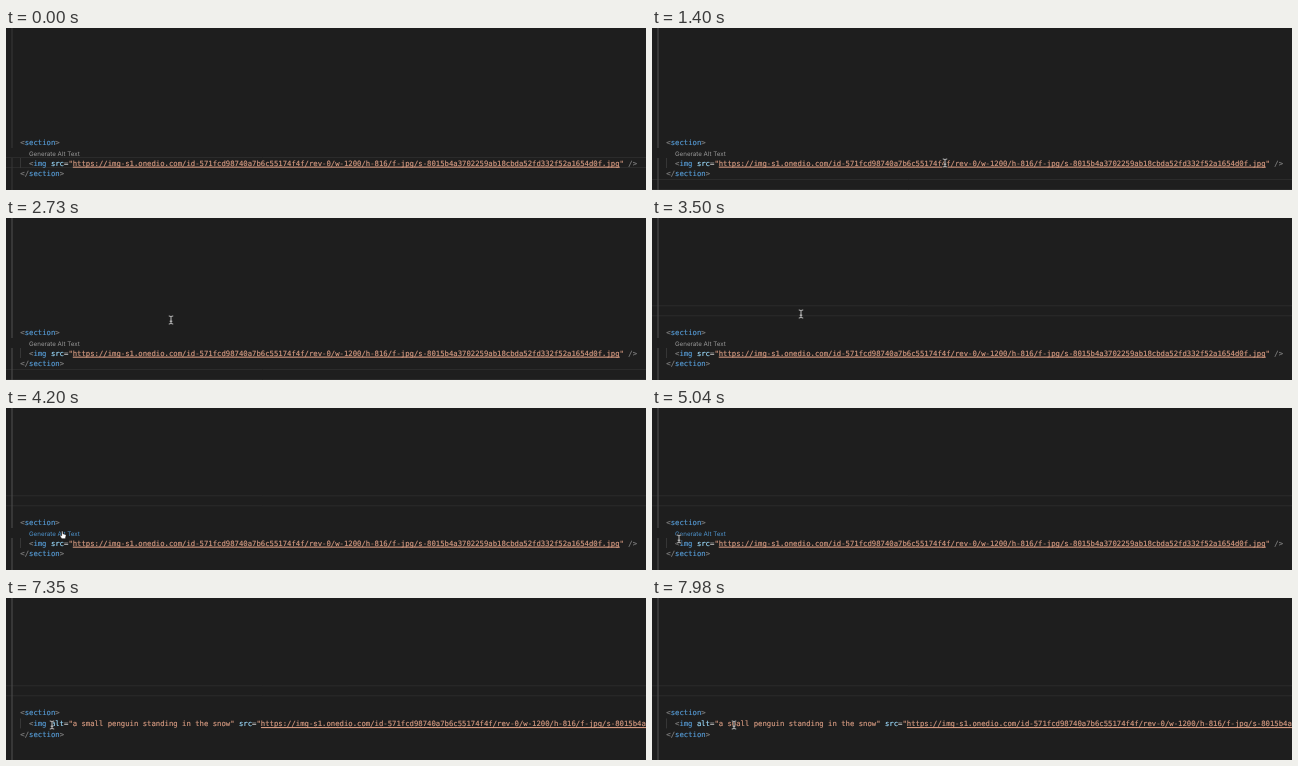
An HTML page for the animation above (8 s loop, 640 px wide and 162 px high).

```html
<!DOCTYPE html>
<html lang="en">
<head>
<meta charset="utf-8">
<style>
  html, body { margin: 0; height: 100%; overflow: hidden; background: #1e1e1e; }
  svg { display: block; }
  text {
    font: 7.27px "DejaVu Sans Mono", monospace;
    white-space: pre;
    text-rendering: geometricPrecision;
    color: #d4d4d4;
  }
  text, tspan { fill: currentColor; stroke: currentColor; stroke-width: .15px; }
  #lens { font: 6.2px Inter, sans-serif; stroke: none; }
  .punct { color: #808080; }
  .tag { color: #569cd6; }
  .attr { color: #9cdcfe; }
  .str { color: #d69a80; }
</style>
</head>
<body>
<svg width="640" height="162" viewBox="0 0 640 162">
  <defs>
    <path id="beamShape" d="M-1.9-4Q-.3-4 0-3.2Q.3-4 1.9-4M0-3.2V3.2M-1.9 4Q-.3 4 0 3.2Q.3 4 1.9 4M-1 1.2H1"/>
  </defs>
  <path id="currentLine" fill="none" stroke="#2b2b2b"/>
  <path id="guide" fill="none"/>
  <text x="14.3" y="117.2"><tspan class="punct">&lt;</tspan><tspan class="tag">section</tspan><tspan class="punct">&gt;</tspan></text>
  <text id="lens" x="23" y="127.5">Generate Alt Text</text>
  <g id="below">
    <path d="M14.5 130V140" stroke="#363636"/>
    <text x="23" y="137.5"><tspan class="punct">&lt;</tspan><tspan class="tag">img</tspan><tspan id="alt"> <tspan class="attr">alt</tspan>=<tspan class="str">"a small penguin standing in the snow"</tspan></tspan> <tspan class="attr">src</tspan>=<tspan class="str">"https://img-s1.onedio.com/id-571fcd98740a7b6c55174f4f/rev-0/w-1200/h-816/f-jpg/s-8015b4a3702259ab18cbda52fd332f52a1654d0f.jpg"</tspan> <tspan class="punct">/&gt;</tspan></text>
    <rect id="underline" y="138.6" width="547" height="1.1" fill="#d69a80"/>
    <text x="14.3" y="148.3"><tspan class="punct">&lt;/</tspan><tspan class="tag">section</tspan><tspan class="punct">&gt;</tspan></text>
  </g>
  <g id="mouse">
    <g id="beam" fill="none" stroke-linecap="round">
      <use href="#beamShape" stroke="#111" stroke-width="1.9"/>
      <use href="#beamShape" stroke="#ddd" stroke-width=".9"/>
    </g>
    <path id="hand" d="M-1.4-3.5Q-.7-4.4 0-3.5V-1.2L2.4-.6Q3.2-.3 3.1.6L2.4 3.8H-1.3L-3.2.8Q-3-.1-2.1.2L-1.4.8Z" fill="#fff" stroke="#111" stroke-width=".6"/>
  </g>
</svg>
<script>
const LOOP = 8000, STEP = 70, CHAR = 4.376, GLIDE = 450;
const $ = id => document.getElementById(id);
const set = (id, name, value) => $(id).setAttribute(name, value);
const show = (id, on) => { $(id).style.display = on ? '' : 'none'; };
const within = (t, from, to) => t >= from && t < to;

// Each stop of the pointer: arrival time and place
const stops = [
  { at: 490, x: 291, y: 154 },
  { at: 1400, x: 293, y: 135 },
  { at: 1960, x: 215, y: 44 },
  { at: 2730, x: 165, y: 102 },
  { at: 3290, x: 149, y: 96 },
  { at: 4060, x: 57, y: 127 },
  { at: 5040, x: 27, y: 131 },
  { at: 5530, x: 32, y: 139 },
  { at: 6020, x: 46, y: 127 },
  { at: 7980, x: 82, y: 127 }
];

function pointer(t) {
  let x = 390, y = 175;
  for (const stop of stops) {
    const k = Math.min(1, Math.max(0, 1 + (t - stop.at) / GLIDE));
    const ease = k * k * (3 - 2 * k);
    x += (stop.x - x) * ease;
    y += (stop.y - y) * ease;
  }
  return [x, y];
}

function draw(now) {
  const t = Math.floor(now % LOOP / STEP) * STEP;
  const inserted = t >= 6930;
  const hover = within(t, 3920, 5250) || t >= 5740;
  const hand = within(t, 3920, 4900);

  const top = t < 490 ? 129.5 : t < 3150 ? 151.5 : 87.8;
  set('currentLine', 'd', `M0 ${top}H640M0 ${top + 10}H640`);
  set('guide', 'd', inserted ? 'M6 0V162' : 'M6 0V120M6 130V162');
  set('guide', 'stroke', t < 490 ? '#383838' : '#505050');

  show('lens', !inserted);
  $('lens').style.color = hover ? '#4e94ce' : '#999';
  show('alt', inserted);
  set('below', 'transform', `translate(0 ${inserted ? -9.6 : 0})`);
  set('underline', 'x', 23 + CHAR * (inserted ? 53 : 10));

  set('mouse', 'transform', `translate(${pointer(t)})`);
  show('beam', !hand);
  show('hand', hand);
  requestAnimationFrame(() => draw(performance.now()));
}
draw(0);
</script>
</body>
</html>
```
